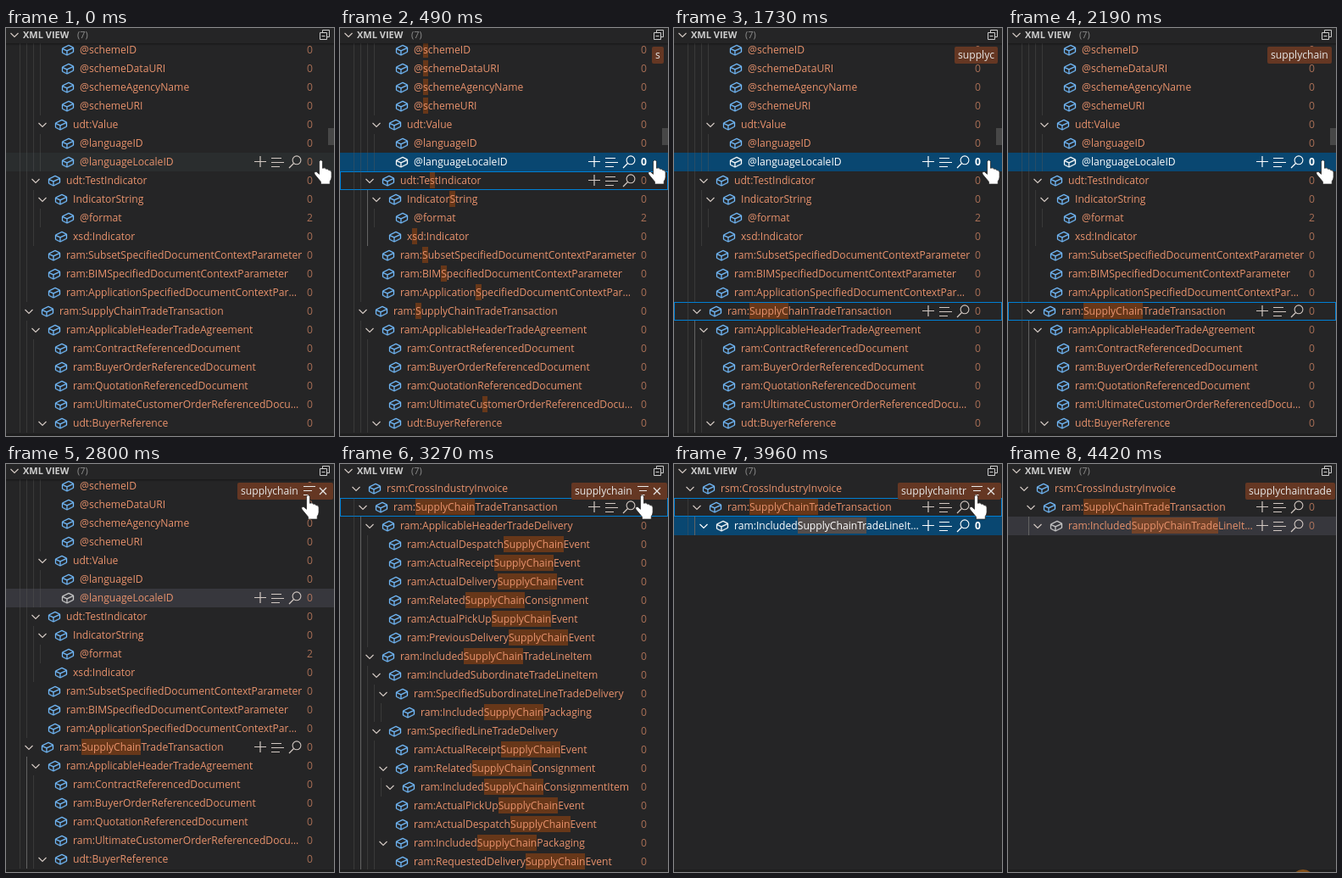
An HTML page for the animation above (5180 ms loop, 387 px wide and 481 px high).

```html
<!DOCTYPE html>
<html lang="en">
<head>
<meta charset="utf-8">
<title>XML view</title>
<style>
html, body { margin: 0; width: 100%; height: 100%; overflow: hidden; background: #252526; }
body { position: relative; font: 12.14px/22px "Open Sans", "Noto Sans", sans-serif; color: #ccc; cursor: default; }
body *, svg { position: absolute; white-space: pre; }
svg { overflow: visible; fill: none; stroke: currentColor; }
.name, .name *, .find span { position: static; }
#tree { left: 0; top: 0; width: 387px; height: 481px; overflow: hidden; }
.row { left: 0; width: 387px; height: 22px; color: #e8926c; }
.row.hover { background: #2a2d2e; }
.row.sel { background: #37373d; }
.live .row.sel { background: #094771; color: #fff; }
.live .row.focus { box-shadow: inset 0 0 0 1px #007fd4; }
.name { position: absolute; top: 0; }
.name b { font-weight: 400; background: rgba(234, 92, 0, .333); padding: 1px 0; }
.cube { color: #75beff; }
.sel .cube { color: #ccc; }
.chev, .act { color: #d2c8c2; }
.live .sel svg { color: #fff; }
.count { left: 355px; top: 0; opacity: .68; }
.live .sel .count { opacity: 1; font-weight: 700; }
.guide { top: 0; width: 1px; height: 22px; background: rgba(88, 88, 88, .4); }
.guide.on { background: #636363; }
.solid { fill: currentColor; stroke-width: .3; }
#head { left: 0; top: 0; width: 387px; height: 18px; background: #252526; font-size: 11px; line-height: 16px; }
#head > b, #head > span { top: 0; }
#shade { left: 0; top: 18px; width: 387px; height: 3px; background: linear-gradient(#0005, #0000); }
#slider { left: 380px; top: 118px; width: 7px; height: 20px; background: #474747; }
#foot { left: 0; top: 478px; width: 387px; height: 3px; background: #1e1e1e; overflow: hidden; }
#dot { left: 334px; top: 0; width: 28px; height: 28px; border-radius: 50%; background: #84501a; }
.find { top: 22px; height: 20px; line-height: 20px; padding: 0 4px; border-radius: 2px; background: #653723; color: #e8e8e8; }
.find.wide { padding-right: 41px; }
</style>
</head>
<body>
<div id="tree"></div>
<div id="shade"></div>
<div id="slider"></div>
<div id="head">
  <svg class="chev" style="left:2px;top:0" width="16" height="16"><path d="M3.500 6 8 10.500 12.500 6" stroke-width="1.200"/></svg>
  <b style="left:20px">XML VIEW</b>
  <span style="left:84px;color:#8c8c8c">(7)</span>
  <svg style="left:370px;top:2px" width="12" height="12"><path d="M3.500 3.500v-3h8v8h-3M.5 3.500h8v8h-8zM2.500 7.500h4"/></svg>
</div>
<div id="foot"><div id="dot"></div></div>
<div id="find" class="find"></div>
<svg id="hand" width="22.500" height="30" viewBox="0 0 24 32"><path fill="#fff" stroke="#222" stroke-width=".8" d="M7 2.500Q9-1 11.200 2.500V11Q14.500 9.500 15.500 12 18 11 19 13.500 22 13 22.500 16V22Q22.500 25 20.500 27.500V31H9V28L1.500 19Q-.5 15 3.500 15.500L7 18.500Z"/></svg>
<script>
const $ = id => document.getElementById(id);
const LOOP = 5180;

// Each line: level, "+" when expanded, name, visible length, visible length beside actions
const parse = text => text.trim().split('\n').map(line => {
  const [level, name, cut, actCut] = line.trim().split(' ');
  return { level: parseInt(level), open: level.endsWith('+'), name, cut: +cut || 99, actCut: +actCut || 99 };
});

const full = parse(`
  4 @schemeID
  4 @schemeDataURI
  4 @schemeAgencyName
  4 @schemeURI
  3+ udt:Value
  4 @languageID
  4 @languageLocaleID
  2+ udt:TestIndicator
  3+ IndicatorString
  4 @format
  3 xsd:Indicator
  2 ram:SubsetSpecifiedDocumentContextParameter 99 31
  2 ram:BIMSpecifiedDocumentContextParameter
  2 ram:ApplicationSpecifiedDocumentContextParameter 42
  1+ ram:SupplyChainTradeTransaction
  2+ ram:ApplicableHeaderTradeAgreement
  3 ram:ContractReferencedDocument
  3 ram:BuyerOrderReferencedDocument
  3 ram:QuotationReferencedDocument
  3 ram:UltimateCustomerOrderReferencedDocument 39
  3+ udt:BuyerReference`);

const found = parse(`
  0+ rsm:CrossIndustryInvoice
  1+ ram:SupplyChainTradeTransaction
  2+ ram:ApplicableHeaderTradeDelivery
  3 ram:ActualDespatchSupplyChainEvent
  3 ram:ActualReceiptSupplyChainEvent
  3 ram:ActualDeliverySupplyChainEvent
  3 ram:RelatedSupplyChainConsignment
  3 ram:ActualPickUpSupplyChainEvent
  3 ram:PreviousDeliverySupplyChainEvent
  2+ ram:IncludedSupplyChainTradeLineItem 99 34
  3+ ram:IncludedSubordinateTradeLineItem
  4+ ram:SpecifiedSubordinateLineTradeDelivery
  5 ram:IncludedSupplyChainPackaging
  3+ ram:SpecifiedLineTradeDelivery
  4 ram:ActualReceiptSupplyChainEvent
  4+ ram:RelatedSupplyChainConsignment
  5+ ram:IncludedSupplyChainConsignmentItem
  4 ram:ActualPickUpSupplyChainEvent
  4 ram:ActualDespatchSupplyChainEvent
  4+ ram:IncludedSupplyChainPackaging
  4 ram:RequestedDeliverySupplyChainEvent
  4 ram:ActualDeliverySupplyChainEvent
  4 ram:PreviousDeliverySupplyChainEvent
  4 ram:RequestedDespatchSupplyChainEvent
  4 ram:PlannedDeliverySupplyChainEvent`);

const LOCALE = '@languageLocaleID', SUBSET = full[11].name, CHAIN = full[14].name, ITEM = found[9].name;

// Changes by time; each one keeps what came before
const steps = [
  [0, { query: '', hover: LOCALE, hand: [363, 155], guides: true }],
  [420, { sel: LOCALE, focus: LOCALE, live: true }],
  [490, { query: 's', focus: 'udt:TestIndicator' }],
  [710, { query: 'su', focus: SUBSET }],
  [910, { query: 'sup' }],
  [1130, { query: 'supp' }],
  [1350, { query: 'suppl', focus: CHAIN }],
  [1500, { query: 'supply' }],
  [1730, { query: 'supplyc' }],
  [1845, { query: 'supplych' }],
  [1960, { query: 'supplycha' }],
  [2080, { query: 'supplychai' }],
  [2190, { query: 'supplychain' }],
  [2700, { hand: [347.5, 36], wide: true, hover: '' }],
  [2800, { live: false }],
  [3270, { live: true, filter: true, sel: '' }],
  [3790, { query: 'supplychaint', sel: ITEM }],
  [3960, { query: 'supplychaintr' }],
  [4075, { query: 'supplychaintra' }],
  [4190, { query: 'supplychaintrad' }],
  [4305, { query: 'supplychaintrade' }],
  [4420, { live: false, wide: false, hand: null, guides: false }]
];

// Fuzzy match: longest run first, the other letters in order after it
function match(name, query) {
  const text = name.toLowerCase();
  for (let n = query.length; n > 0; n--) {
    let at = text.indexOf(query.slice(0, n));
    if (at < 0) continue;
    const hits = Array.from({ length: n }, (_, i) => at + i);
    at += n - 1;
    for (const ch of query.slice(n)) {
      at = text.indexOf(ch, at + 1);
      if (at < 0) break;
      hits.push(at);
    }
    if (at >= 0) return hits;
  }
  return null;
}

// Keep matching rows and their ancestors
function filterRows(rows, query) {
  const kept = [];
  let need = -1;
  for (const row of [...rows].reverse()) {
    if (match(row.name, query) || row.level < need) {
      kept.unshift(row);
      need = row.level;
    }
  }
  return kept;
}

function label(row, query, acts) {
  const cut = acts ? row.actCut : row.cut;
  const hits = new Set(match(row.name, query));
  const html = [...row.name.slice(0, cut)].map((ch, i) => hits.has(i) ? `<b>${ch}</b>` : ch).join('');
  return html.replaceAll('</b><b>', '') + (cut < row.name.length ? '…' : '');
}

const svg = (cls, x, y, body) => `<svg class="${cls}" style="left:${x}px;top:${y}px" width="16" height="16">${body}</svg>`;
const CHEVRON = '<path d="M3.500 6 8 10.500 12.500 6" stroke-width="1.200"/>';
const CUBE = '<path class="solid" d="M14.450 4.500l-5-2.500h-.9l-7 3.500-.55.89v4.500l.55.9 5 2.500h.9l7-3.500.55-.9v-4.500l-.55-.89zm-8 8.640l-4.500-2.250V7.170l4.500 2v3.970zm.5-4.800L2.290 6.230l6.660-3.340 4.670 2.340-6.670 3.110zm7 1.550l-6.500 3.250V9.210l6.500-3v3.680z"/>';
const ACTIONS =
  svg('act', 292, 3, '<path d="M1 7.500h14M8 1v13" stroke-width="1.200"/>') +
  svg('act', 312, 3, '<path d="M1 3.500h12M1 8.500h15M1 13.500h10"/>') +
  svg('act', 333, 3, '<path d="M6.500 9.500 1 15" stroke-width="1.200"/><circle cx="10" cy="5.800" r="4.900" stroke-width="1.100"/>');

// Row that owns the indent guide of a level; negative when it is scrolled away
function owner(rows, i, level) {
  while (--i >= 0) if (rows[i].level <= level) return rows[i].level === level ? i : -1 - level;
  return -1 - level;
}

function drawRow(row, i, rows, s, active) {
  const { level, name, open } = row;
  const x = 8 * level;
  const isFocus = name === s.focus;
  const acts = isFocus || name === s.sel || name === s.hover;
  const cls = ['row', name === s.hover && 'hover', name === s.sel && 'sel', isFocus && 'focus'].filter(Boolean).join(' ');
  let html = '';
  for (let k = 0; k < level; k++) {
    const on = owner(rows, i, k) === active;
    if (on || s.guides) html += `<i class="guide${on ? ' on' : ''}" style="left:${16 + 8 * k}px"></i>`;
  }
  if (open) html += svg('chev', 11 + x, 3, CHEVRON);
  html += svg('cube', 33 + x, 3, CUBE);
  html += `<span class="name" style="left:${55 + x}px">${label(row, s.query, acts)}</span>`;
  if (acts) html += ACTIONS;
  html += `<span class="count">${name === '@format' ? 2 : 0}</span>`;
  return `<div class="${cls}" style="top:${(s.filter ? 18 : 15) + 22 * i}px">${html}</div>`;
}

const show = (id, on) => { $(id).style.display = on ? '' : 'none'; };

function drawFind(s) {
  const box = $('find');
  show('find', s.query);
  box.className = s.wide ? 'find wide' : 'find';
  box.innerHTML = `<span>${s.query}</span>`;
  if (s.wide) {
    const lines = s.filter ? 'M1 3.500h13M3 8.500h9M5.500 13.500h4' : 'M1 3.500h14M1 8.500h10M1 13.500h6';
    box.innerHTML += `<svg style="right:20px;top:1px" width="16" height="16"><path d="${lines}"/></svg>` +
      '<svg style="right:4px;top:2px" width="16" height="16"><path d="M4 4l8 8M12 4l-8 8" stroke-width="1.200"/></svg>';
  }
  const right = s.filter || s.wide ? 386 : 382;
  box.style.left = right - box.offsetWidth + 'px';
}

function draw(s) {
  const rows = s.filter ? filterRows(found, s.query) : full;
  const at = rows.findIndex(r => r.name === s.focus);
  const active = at < 0 ? null : rows[at].open ? at : owner(rows, at, rows[at].level - 1);
  $('tree').className = s.live ? 'live' : '';
  $('tree').innerHTML = rows.map((row, i) => drawRow(row, i, rows, s, active)).join('');
  show('shade', !s.filter);
  show('slider', !s.wide && !s.filter);
  show('dot', !s.hand);
  show('hand', s.hand);
  if (s.hand) {
    $('hand').style.left = s.hand[0] + 'px';
    $('hand').style.top = s.hand[1] + 'px';
  }
  drawFind(s);
}

let shown = -1;
const start = performance.now();
function tick() {
  const t = (performance.now() - start) % LOOP;
  const now = steps.filter(([at]) => at <= t).length;
  if (now !== shown) {
    shown = now;
    draw(Object.assign({}, ...steps.slice(0, now).map(step => step[1])));
  }
  requestAnimationFrame(tick);
}
tick();
</script>
</body>
</html>
```
